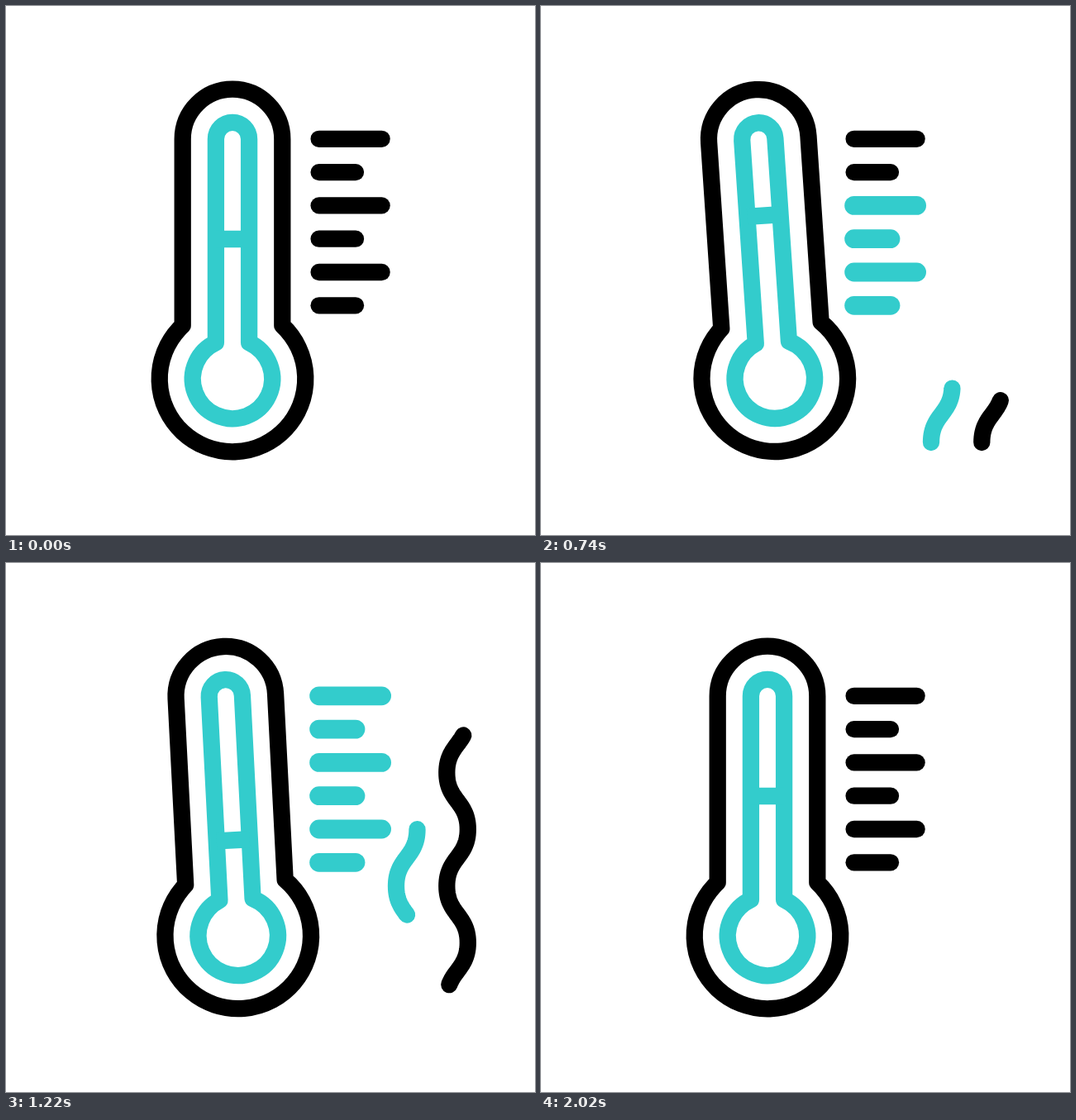
These frames come from a looping animation (640x640 px, 2420 ms). An HTML page with a canvas:

```html
<!DOCTYPE html>
<html lang="en">
<head>
<meta charset="utf-8">
<title>Thermometer</title>
<style>
  html, body { margin: 0; width: 100%; height: 100%; overflow: hidden; background: #fff; }
  canvas { display: block; width: 640px; height: 640px; }
</style>
</head>
<body>
<canvas id="stage" width="640" height="640"></canvas>
<script>
const ctx = document.getElementById('stage').getContext('2d');
const LOOP = 2420, STEP = 20, MOTION_END = 2020;
const BLACK = '#000', TEAL = '#33cccc', LINE = 20.3;
const PIVOT = { x: 274, y: 320 };

// [time in ms, value]
const TILT = [[0, 0], [567, -12.9], [933, 6.8], [1300, -4.3], [1633, 0]];
const LEVEL = [[0, 282], [467, 330], [933, 208], [1233, 336], [1533, 258], [2000, 282]];

const WAVES = [
  { x: 472, turns: 3, color: TEAL, head: [539, 1072], tail: [908, 1534] },
  { x: 533.3, turns: 5, color: BLACK, head: [543, 1345], tail: [1100, 2000] }
];

function ease(t, from, to) {
  const u = Math.min(1, Math.max(0, (t - from) / (to - from)));
  return u * u * (3 - 2 * u);
}

function track(keys, t) {
  for (let i = 1; i < keys.length; i++) {
    const [t0, a] = keys[i - 1], [t1, b] = keys[i];
    if (t < t1) return a + (b - a) * ease(t, t0, t1);
  }
  return keys[keys.length - 1][1];
}

function stroke(color, width = LINE) {
  ctx.strokeStyle = color;
  ctx.lineWidth = width;
  ctx.stroke();
}

function line(x0, y0, x1, y1, color, width) {
  ctx.beginPath();
  ctx.moveTo(x0, y0);
  ctx.lineTo(x1, y1);
  stroke(color, width);
}

// Tube with a round top and a bulb, centred on the pivot
function tube(half, bulb, color) {
  const top = 161 - PIVOT.y, base = 451 - PIVOT.y;
  const a = Math.asin(half / bulb);
  ctx.beginPath();
  ctx.arc(0, top, half, Math.PI, 0);
  ctx.arc(0, base, bulb, a - Math.PI / 2, Math.PI * 1.5 - a);
  ctx.closePath();
  stroke(color);
}

function thermometer(t) {
  const y = track(LEVEL, t) - PIVOT.y;
  ctx.save();
  ctx.translate(PIVOT.x, PIVOT.y);
  ctx.rotate(track(TILT, t) * Math.PI / 180);
  tube(60.3, 88.3, BLACK);
  tube(20.1, 48.2, TEAL);
  ctx.lineCap = 'butt';
  line(-20, y, 20, y, TEAL);
  ctx.restore();
}

function scale(t) {
  for (let i = 0; i < 6; i++) {
    const y = 362.3 - i * 40.3;
    const on = 467 + i * 80, off = 2100 - on;
    const lit = t >= on && t < off;
    line(378.6, y, i % 2 ? 454.6 : 423, y, lit ? TEAL : BLACK, lit ? 22.8 : LINE);
  }
}

// Points along a wave rising from the bottom, with running length
function wavePoints(x, turns) {
  const pts = [], N = 30;
  let len = 0;
  for (let i = 0; i <= turns * N; i++) {
    const seg = Math.min(turns - 1, Math.floor(i / N)), s = i / N - seg;
    const side = s * s * (3 - 2 * s);
    const p = {
      x: x + 25.5 * (seg % 2 ? 1 - side : side),
      y: 528 - 68.6 * (seg + 1.5 * s * (1 - s) + s ** 3)
    };
    if (i) len += Math.hypot(p.x - pts[i - 1].x, p.y - pts[i - 1].y);
    p.len = len;
    pts.push(p);
  }
  return pts;
}

for (const w of WAVES) w.pts = wavePoints(w.x, w.turns);

function pointAt(pts, d) {
  const i = Math.max(1, pts.findIndex(p => p.len >= d));
  const a = pts[i - 1], b = pts[i], k = (d - a.len) / (b.len - a.len);
  return [a.x + (b.x - a.x) * k, a.y + (b.y - a.y) * k];
}

function wave({ pts, color, head, tail }, t) {
  const total = pts[pts.length - 1].len;
  const from = total * ease(t, ...tail), to = total * ease(t, ...head);
  if (to <= from) return;
  ctx.beginPath();
  ctx.moveTo(...pointAt(pts, from));
  for (const p of pts) if (p.len > from && p.len < to) ctx.lineTo(p.x, p.y);
  ctx.lineTo(...pointAt(pts, to));
  stroke(color);
}

function draw(t) {
  ctx.fillStyle = '#fff';
  ctx.fillRect(0, 0, 640, 640);
  ctx.lineCap = ctx.lineJoin = 'round';
  thermometer(t);
  scale(t);
  for (const w of WAVES) wave(w, t);
}

const start = performance.now();

function frame() {
  const t = (performance.now() - start) % LOOP;
  draw(Math.min(MOTION_END, Math.floor(t / STEP) * STEP));
  requestAnimationFrame(frame);
}
frame();
</script>
</body>
</html>
```
